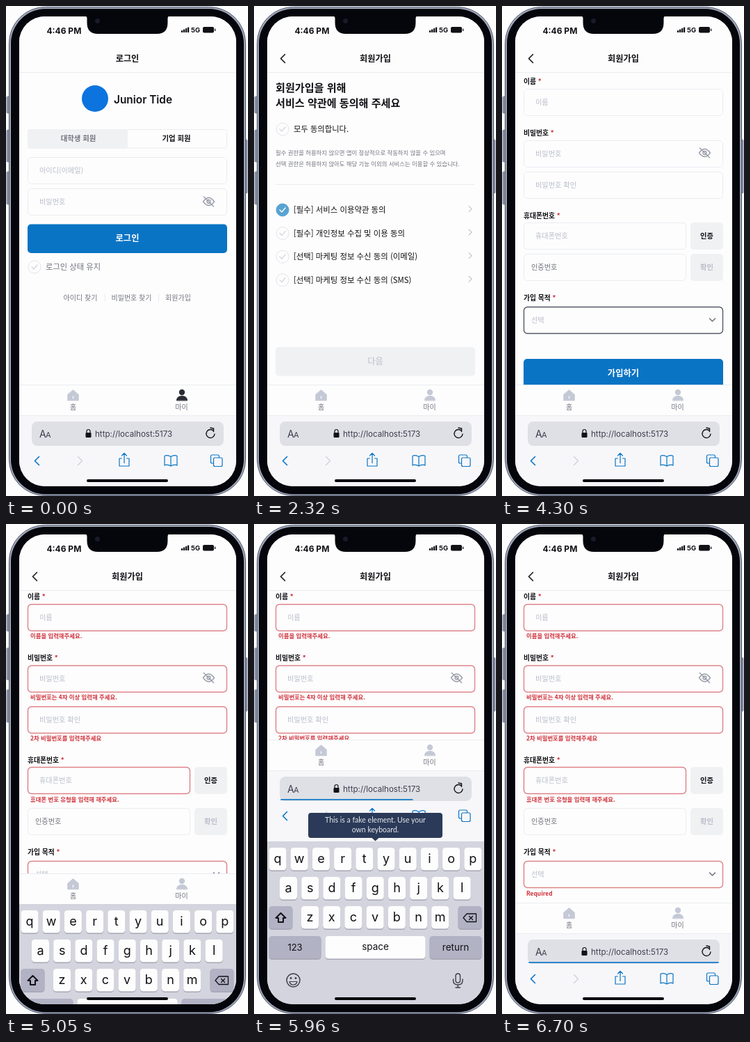
Write an HTML page that moves like this. It is 348 px wide and 704 px high and loops after 7.28 s.

```html
<!DOCTYPE html>
<html lang="ko">
<head>
<meta charset="utf-8">
<style>
html, body { margin: 0; width: 100%; height: 100%; overflow: hidden; background: #fdfdfd; }
svg { display: block; width: 348px; height: 704px; }
text { font-family: 'Noto Sans CJK KR', 'Noto Sans CJK', sans-serif; white-space: pre; }
.latin { font-family: Inter, sans-serif; }
.tip { font-family: Lato, sans-serif; }
</style>
</head>
<body>
<svg id="stage" viewBox="0 0 348 704"></svg>
<script>
const LOOP = 7280, TICK = 82.73;
const INK = '#111116', PAPER = '#fdfdfd', BLUE = '#0a74c4', MUTED = '#72747f',
  HINT = '#b9bdcb', PALE = '#eff1f3', LINE = '#eaecf1', RED = '#d0303a', DARK = '#555866',
  EDGE = '#dd8288', GLYPH = '#3c3f4c', ICON = '#c5c9d6';

const clamp = v => Math.max(0, Math.min(1, v));
const smooth = v => (v = clamp(v), v * v * (3 - 2 * v));
const easeOut = v => 1 - Math.pow(1 - clamp(v), 2.5);

// Drawing helpers; text is centred vertically on y
const text = (x, y, size, str, fill = INK, weight = 400, anchor = 'start', cls = '') =>
  `<text x="${x}" y="${y + size * .36}" font-size="${size}" fill="${fill}" font-weight="${weight}" text-anchor="${anchor}" class="${cls}">${str}</text>`;
const mid = (x, y, size, str, fill, weight, cls) => text(x, y, size, str, fill, weight, 'middle', cls);
const rect = (x, y, w, h, r, fill, stroke = 'none', sw = 1) =>
  `<rect x="${x}" y="${y}" width="${w}" height="${h}" rx="${r}" fill="${fill}" stroke="${stroke}" stroke-width="${sw}"/>`;
const path = (d, stroke, w = 1.3, fill = 'none') =>
  `<path d="${d}" stroke="${stroke}" stroke-width="${w}" fill="${fill}" stroke-linecap="round" stroke-linejoin="round"/>`;
const circle = (x, y, r, fill, stroke = 'none', w = 1) =>
  `<circle cx="${x}" cy="${y}" r="${r}" fill="${fill}" stroke="${stroke}" stroke-width="${w}"/>`;
const group = (x, y, body, extra = '') => `<g transform="translate(${x} ${y})" ${extra}>${body}</g>`;

const button = (y, label, fill = BLUE, ink = '#ffffff') =>
  rect(31, y, 287, 41.5, 5, fill) + mid(174.5, y + 20.5, 12.3, label, ink, 700);
const field = (y, hint, border = LINE, w = 286, x = 48, ink = HINT) =>
  rect(31.5, y + .5, w, 38, 5, PAPER, border, border === LINE ? 1 : 1.4) + text(x, y + 19.5, 10.2, hint, ink);
const check = (y, on) => circle(41, y, 9, on ? '#58a3d2' : 'none', on ? '#58a3d2' : '#e2e4ea') +
  path(`M37 ${y}l3 3l5 -6`, on ? '#ffffff' : '#d5d8e0', 1.4);
const eye = y => group(291.5, y,
  path('M-8 0Q-4 -5.5 0 -5.5Q4 -5.5 8 0Q4 5.5 0 5.5Q-4 5.5 -8 0ZM-7 -7L7 7', '#999ca8', 1.4) +
  circle(0, 0, 2.5, 'none', '#999ca8', 1.3));

function login() {
  return circle(128, 133, 19, '#0d73de') +
    text(155, 134, 15.4, 'Junior Tide', INK, 600, 'start', 'latin') +
    rect(31.5, 177.5, 286, 26.5, 3, PAPER, LINE) + rect(31, 177, 144, 27.5, 3, PALE) +
    mid(104, 190, 10.4, '대학생 회원', MUTED, 700) + mid(245, 190, 10.4, '기업 회원', INK, 700) +
    field(217, '아이디(이메일)') + field(262, '비밀번호') + eye(281) +
    button(313.5, '로그인') + check(375) + text(57, 375, 11.3, '로그인 상태 유지', MUTED) +
    mid(107, 419, 10, '아이디 찾기', MUTED) + mid(180.5, 419, 10, '비밀번호 찾기', MUTED) +
    mid(247.5, 419, 10, '회원가입', MUTED) + path('M142.5 414v10M219.5 414v10', LINE, 1);
}

function terms(k) {
  const all = k >= 33;
  const items = ['[필수] 서비스 이용약관 동의', '[필수] 개인정보 수집 및 이용 동의',
    '[선택] 마케팅 정보 수신 동의 (이메일)', '[선택] 마케팅 정보 수신 동의 (SMS)'];
  return text(31, 118, 15.1, '회원가입을 위해', INK, 700) +
    text(31, 140, 15.1, '서비스 약관에 동의해 주세요', INK, 700) +
    check(177, all) + text(57, 177, 11.3, '모두 동의합니다.', INK, 500) +
    text(31, 211, 8.4, '필수 권한을 허용하지 않으면 앱이 정상적으로 작동하지 않을 수 있으며', MUTED) +
    text(31, 227, 8.4, '선택 권한은 허용하지 않아도 해당 기능 이외의 서비스는 이용할 수 있습니다.', MUTED) +
    path('M31 256.5H317', LINE, 1) +
    items.map((s, i) => {
      const y = 293 + 33.6 * i;
      return check(y, all || (i === 0 && k >= 28)) + text(57, y, 11.4, s, INK, 500) +
        path(`M309 ${y - 5.5}l4 4l-4 4`, '#a2a5b0', 1);
    }).join('') +
    (all ? button(490, '다음') : button(490, '다음', PALE, '#cdd0d9'));
}

// Each error message pushes the rest of the form down
function form(err, pressed) {
  const gap = err ? 14 : 0;
  const edge = err ? EDGE : LINE;
  const label = (y, s) => text(31, y, 9.8, `${s} <tspan fill="${RED}">*</tspan>`, INK, 700);
  const note = (y, s) => err ? text(35, y, 8.4, s, RED, 700) : '';
  const side = (y, s, ink) => rect(271, y, 47, 39, 5, PALE) + mid(294.5, y + 19.5, 10.3, s, ink, 700);
  const at = (y, n) => y + gap * n;
  return label(114, '아이디(이메일)') + field(125, '아이디(이메일)', edge) +
    note(172, '아이디를 입력해주세요.') +
    label(at(187, 1), '이름') + field(at(198, 1), '이름', edge) +
    note(at(244, 1), '이름을 입력해주세요.') +
    label(at(261, 2), '비밀번호') + field(at(272, 2), '비밀번호', edge) + eye(at(290, 2)) +
    note(at(318, 2), '비밀번호는 4자 이상 입력해 주세요.') +
    field(at(317, 3), '비밀번호 확인', edge) +
    note(at(363, 3), '2차 비밀번호를 입력해주세요') +
    label(at(380, 4), '휴대폰번호') + field(at(390, 4), '휴대폰번호', edge, 233) +
    side(at(390, 4), '인증', INK) + note(at(437, 4), '휴대폰 번호 유형을 입력해 해주세요.') +
    field(at(435, 5), '인증번호', LINE, 233, 42, MUTED) + side(at(435, 5), '확인', HINT) +
    label(at(498, 5), '가입 목적') + field(at(511, 5), '선택', err ? EDGE : DARK, 286, 42) +
    path(`M298.5 ${at(528, 5)}l4 4l4 -4`, MUTED, 1.6) + note(at(558, 5), 'Required') +
    button(at(586, 6), '가입하기', pressed ? '#09639f' : BLUE);
}

function header(first) {
  return rect(19, 15, 312, 81, 0, PAPER) + path('M19 95.5H331', LINE, 1) +
    mid(174.5, 76, 12.2, first ? '로그인' : '회원가입', INK, 700) +
    (first ? '' : path('M44.5 69.5l-6 6l6 6', INK, 1.5));
}

function nav(y, mine) {
  const ink = mine ? '#2a2c36' : ICON;
  return group(0, y, rect(19, 0, 312, 44, 0, PAPER) + path('M19 .5H331', LINE, 1) +
    path('M89 14.5L96.5 8L104 14.5V22.5H89Z', ICON, 1.5, ICON) + path('M96.5 17v2.5', PAPER, 1.3) +
    mid(96.5, 32.5, 10, '홈', MUTED, 500) +
    circle(253, 11, 4.2, ink) + path('M245.5 22.5Q245.5 16.5 253 16.5Q260.5 16.5 260.5 22.5Z', ink, 1, ink) +
    mid(252.5, 32.5, 10, '마이', MUTED, 500));
}

function browserBar(y, loaded) {
  return group(0, y, rect(19, 0, 312, 200, 0, '#f7f7fa') + path('M19 .5H331', LINE, 1) +
    rect(37, 9, 276, 35, 8, '#dfe0e6') +
    (loaded ? path(`M39 42h${272 * loaded}`, '#2b86cc', 1.8) : '') +
    text(48, 27, 14, 'A', GLYPH, 400, 'start', 'latin') + text(57, 28, 11, 'A', GLYPH, 400, 'start', 'latin') +
    rect(114.5, 25, 8, 7, 1.2, INK) + path('M116 25v-2a2.5 2.5 0 0 1 5 0v2', INK, 1.2) +
    text(128, 27, 11.6, 'http://localhost:5173', GLYPH, 400, 'start', 'latin') +
    path('M298.5 22.5A6 6 0 1 0 300 27M294 18l4.500 1v4.500', INK, 1.4) +
    path('M47.5 59.5l-6 6l6 6', BLUE, 1.6) + path('M103.5 59.5l6 6l-6 6', '#d3d6de', 1.6) +
    path('M166.5 62h-3.5v11h14v-11h-3.5M170 68.5V55M166.5 58l3.5 -3.5l3.5 3.5', BLUE, 1.2) +
    path('M237 59.5Q232 56.5 228 58.5V72Q232 70 237 73Q242 70 246 72V58.5Q242 56.5 237 59.5V73', BLUE, 1.2) +
    path('M298 69h-1.5q-2 0 -2 -2v-8q0 -2 2 -2h8q2 0 2 2v1.5', BLUE, 1.2) +
    rect(298.5, 61, 12.5, 12.5, 2, 'none', BLUE, 1.2));
}

function keyboard(y) {
  const key = (x, ky, w, fill = PAPER) => rect(x, ky + 1, w, 33, 4.5, '#a5a6b4') + rect(x, ky, w, 32.5, 4.5, fill);
  const grey = '#b1b2c4';
  const rows = [['qwertyuiop', 34, 9], ['asdfghjkl', 49.5, 51], ['zxcvbnm', 80.5, 93]];
  return group(0, y, rect(19, 0, 312, 250, 0, '#d4d4de') +
    rows.map(([keys, x, ky]) => [...keys].map((c, i) =>
      key(x + 31.2 * i - 12.5, ky, 25) + mid(x + 31.2 * i, ky + 16, 18, c, INK, 400, 'latin')).join('')).join('') +
    key(21.5, 93, 34, grey) + key(293.5, 93, 34, grey) +
    path('M38.5 103l-7 7h3.5v6h7v-6h3.5Z', INK, 2) +
    path('M306 104h13.5v11.5h-13.5l-5 -5.75ZM309.5 107.5l5 5M314.5 107.5l-5 5', INK, 1.3) +
    key(21.5, 136, 75, grey) + key(102.5, 136, 144) + key(252.5, 136, 75, grey) +
    mid(59, 152, 13, '123', INK, 400, 'latin') + mid(174.5, 151, 13.5, 'space', INK, 400, 'latin') +
    mid(290, 152, 13.5, 'return', INK, 400, 'latin') +
    circle(56.5, 199.5, 9.5, 'none', GLYPH, 1.5) + circle(53, 196.5, 1.4, GLYPH) + circle(60, 196.5, 1.4, GLYPH) +
    path('M51 201.5h11q-1 4.5 -5.5 4.5t-5.5 -4.5Z', GLYPH, 1.2) +
    rect(290, 190, 6.5, 13, 3.25, 'none', GLYPH, 1.4) +
    path('M286.5 198v2q0 6 6.75 6t6.75 -6v-2M293.25 206v4M290 210h6.5', GLYPH, 1.4));
}

const tip = (y, alpha) => group(0, y,
  rect(78, -41, 193, 36, 4, '#2b3a58') + path('M169.5 -5h10l-5 4.5Z', 'none', 0, '#2b3a58') +
  mid(174.5, -30.5, 10.5, 'This is a fake element. Use your', '#e6e8ee', 400, 'tip') +
  mid(174.5, -16.5, 10.5, 'own keyboard.', '#e6e8ee', 400, 'tip'), `opacity="${alpha}"`);

const phone = [[1, 130, 24], [1, 178, 46], [1, 238, 47], [343, 192, 77]]
  .map(([x, y, h]) => rect(x, y, 4, h, 1.5, '#8f95a8', '#5f667c', .6)).join('') +
  rect(4.5, 1.5, 340, 702, 52, '#a3a9ba', '#4d556c') + rect(7, 4, 335, 697.5, 50, '#05060c') +
  '<clipPath id="screen"><rect x="19" y="15" width="312" height="675" rx="37"/></clipPath>';

const status = path('M112 14H237Q232.5 14 232.5 18V24Q232.5 40 217 40H132Q116.5 40 116.5 24V18Q116.5 14 112 14Z', 'none', 0, '#05060c') +
  circle(131.5, 21.5, 3.5, '#171a28') +
  text(58.5, 36, 12, '4:46 PM', INK, 700, 'start', 'latin') +
  [3, 4.5, 6, 7.5].map((h, i) => rect(252 + 3 * i, 38 - h, 2.2, h, .5, INK)).join('') +
  text(266, 34.5, 9.5, '5G', INK, 700, 'start', 'latin') +
  rect(283, 30, 16, 8.5, 2, INK) + rect(300, 32.5, 1.3, 3.5, .6, INK) +
  rect(116, 680, 117, 4, 2, '#05060c');

function scene(k) {
  const first = k < 8, err = k >= 61, closing = k >= 72;
  const scroll = err ? 97 : 158 * smooth((k - 49) / 6);
  const board = closing ? 456 + 248 * easeOut((k - 72) / 3) : 704 - 248 * easeOut((k - 60) / 3);
  const bar = closing ? Math.min(588, board - 102) : 588;
  const navY = Math.min(bar, board) - 44;
  const tipAlpha = clamp((k - 66) / 3) * clamp(75 - k);
  const loaded = closing ? 1 - .034 * (81 - Math.min(k, 81)) : 0;
  const page = first ? login() : k < 41 ? terms(k) : group(0, -scroll, form(err, k >= 59));
  return phone + `<g clip-path="url(#screen)">` + rect(19, 15, 312, 675, 0, PAPER) + page +
    header(first) + nav(navY, first) + browserBar(bar, loaded) +
    (board < 704 ? keyboard(board) : '') + (tipAlpha ? tip(board, tipAlpha) : '') + '</g>' + status;
}

const stage = document.getElementById('stage');
const start = performance.now();
let shown = -1;
function draw() {
  const t = (performance.now() - start) % LOOP;
  const k = Math.floor((t + 5) / TICK) % 88;
  if (k !== shown) stage.innerHTML = scene(shown = k);
  requestAnimationFrame(draw);
}
draw();
</script>
</body>
</html>
```
